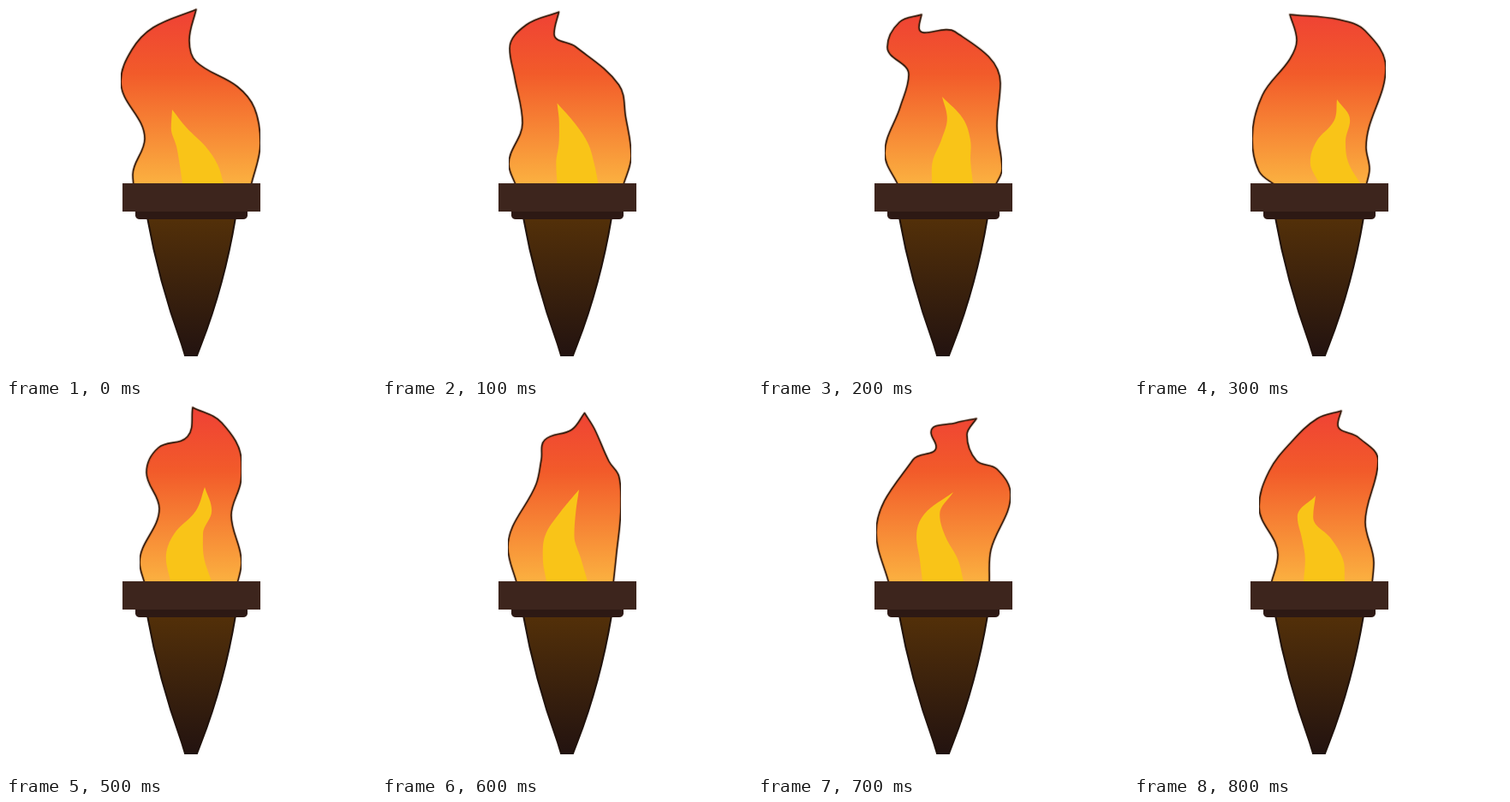
Animation, 432 px wide and 432 px high, one loop 0.9 s. Source, as an HTML page:

```html
<!DOCTYPE html>
<html lang="en">
<head>
<meta charset="utf-8">
<title>Torch</title>
<style>
  html, body { margin: 0; width: 100%; height: 100%; overflow: hidden; background: #fff; }
  svg { display: block; width: 100vw; height: 100vh; }
</style>
</head>
<body>
<svg viewBox="0 0 432 432">
  <defs>
    <linearGradient id="fire" gradientUnits="userSpaceOnUse" x1="0" y1="4" x2="0" y2="207">
      <stop offset="0" stop-color="#ef4135"/>
      <stop offset=".37" stop-color="#f25b2a"/>
      <stop offset="1" stop-color="#fbb040"/>
    </linearGradient>
    <linearGradient id="wood" x1="0" y1="0" x2="0" y2="1">
      <stop offset="0" stop-color="#533009"/>
      <stop offset="1" stop-color="#231310"/>
    </linearGradient>
    <clipPath id="sides"><rect id="span" y="0" height="212"/></clipPath>
  </defs>

  <g clip-path="url(#sides)" stroke-linejoin="round">
    <path id="flame" fill="url(#fire)" stroke="#2a1a10" stroke-width="1.6"/>
    <path id="shade" fill="none" stroke="#5a2408" stroke-opacity=".2" stroke-width="3.5"/>
  </g>
  <path id="core" fill="#f9c418"/>

  <path d="M165 247Q178 320 205 395L209 408H223L228 395Q255 325 268 247Z"
        fill="url(#wood)" stroke="#21130c" stroke-width="2"/>
  <path d="M151 238H282V245Q281 249 277 249H156Q152 249 151 245Z" fill="#2d1914"/>
  <rect x="136" y="207" width="161" height="33" fill="#3d251d"/>
</svg>
<script>
const STEP = 100, STEPS = 9, RIM = 207;
const poses = [];
const byId = id => document.getElementById(id);
const parse = text => text.split(' ').map(pair => pair.split(',').map(Number));

// Key points of the flame edges (left up to the tip, right down again),
// and the sway of the core's spine at even heights up to coreTop.
function addPose(step, left, right, coreTop, sway) {
  const spine = sway.map((x, i) => [x, RIM + (coreTop - RIM) * i / (sway.length - 1)]);
  poses.push({ step, lines: [parse(left), parse(right), spine] });
}

addPose(0, '149,210 148,197 162,155 134,88 147,51 172,25 222,4',
  '214,40 222,65 270,94 290,119 297,160 286,210', 121, [230, 225, 216, 202, 194]);
addPose(2, '164,210 148,172 166,118 176,80 151,48 165,19 191,10',
  '188,25 230,30 283,90 279,140 285,190 277,210', 106, [227, 226, 231, 230, 215]);
addPose(3, '166,210 146,193 138,155 150,104 182,62 190,40 182,10',
  '240,16 270,29 294,72 271,165 275,190 271,210', 109, [240, 228, 230, 243, 237]);
addPose(5, '162,210 156,185 179,122 164,80 178,51 212,38 218,4',
  '252,22 275,68 274,92 263,130 275,185 270,210', 97, [216, 209, 213, 231, 232]);
addPose(7, '153,210 138,150 181,65 208,50 202,33 231,22 255,17',
  '244,36 255,66 279,76 295,106 272,170 270,210', 103, [216, 211, 202, 203, 228]);
addPose(8, '160,210 168,176 146,120 158,78 184,44 214,17 242,8',
  '238,24 262,39 285,66 270,138 280,185 278,210', 107, [222, 222, 213, 200, 212]);

// Smooth curve through the points; it never overshoots a turning point.
function spline(points) {
  const last = points.length - 1;
  const headings = points.map((p, i) => {
    const before = points[Math.max(0, i - 1)], after = points[Math.min(last, i + 1)];
    const inner = i > 0 && i < last;
    const d = p.map((v, k) =>
      inner && (after[k] - v) * (v - before[k]) <= 0 ? 0 : after[k] - before[k]);
    const size = Math.hypot(...d) || 1;
    return d.map(v => v / size);
  });
  return points.slice(1).map((p, i) => {
    const q = points[i];
    const reach = .36 * Math.hypot(p[0] - q[0], p[1] - q[1]);
    const handle = (from, heading, sign) => from.map((v, k) => v + sign * reach * heading[k]);
    return `C${handle(q, headings[i], 1)} ${handle(p, headings[i + 1], -1)} ${p}`;
  }).join('');
}

function outline(left, right) {
  return `M${left[0]}${spline(left)}${spline([left.at(-1), ...right])}Z`;
}

// The core tapers from the rim to its tip around the spine.
function coreOutline(spine) {
  const edge = side => spine.map(([x, y], i) =>
    [x + side * 24 * Math.cos(i / (spine.length - 1) * Math.PI / 2), y]);
  return outline(edge(-1), edge(1).reverse().slice(1));
}

function linesAt(step) {
  const i = poses.findLastIndex(pose => pose.step <= step);
  const from = poses[i], to = poses[(i + 1) % poses.length];
  const mix = (step - from.step) / ((to.step - from.step + STEPS) % STEPS);
  return from.lines.map((line, n) => line.map((p, j) =>
    p.map((v, k) => v + (to.lines[n][j][k] - v) * mix)));
}

function draw(step) {
  const [left, right, spine] = linesAt(step);
  const xs = [...left, ...right].map(p => p[0]);
  const minX = Math.min(...xs);
  byId('span').setAttribute('x', minX);
  byId('span').setAttribute('width', Math.max(...xs) - minX);
  const flame = outline(left, right);
  byId('flame').setAttribute('d', flame);
  byId('shade').setAttribute('d', flame);
  byId('core').setAttribute('d', coreOutline(spine));
}

const start = performance.now();
function tick() {
  draw(Math.floor((performance.now() - start) / STEP) % STEPS);
  requestAnimationFrame(tick);
}
tick();
</script>
</body>
</html>
```
